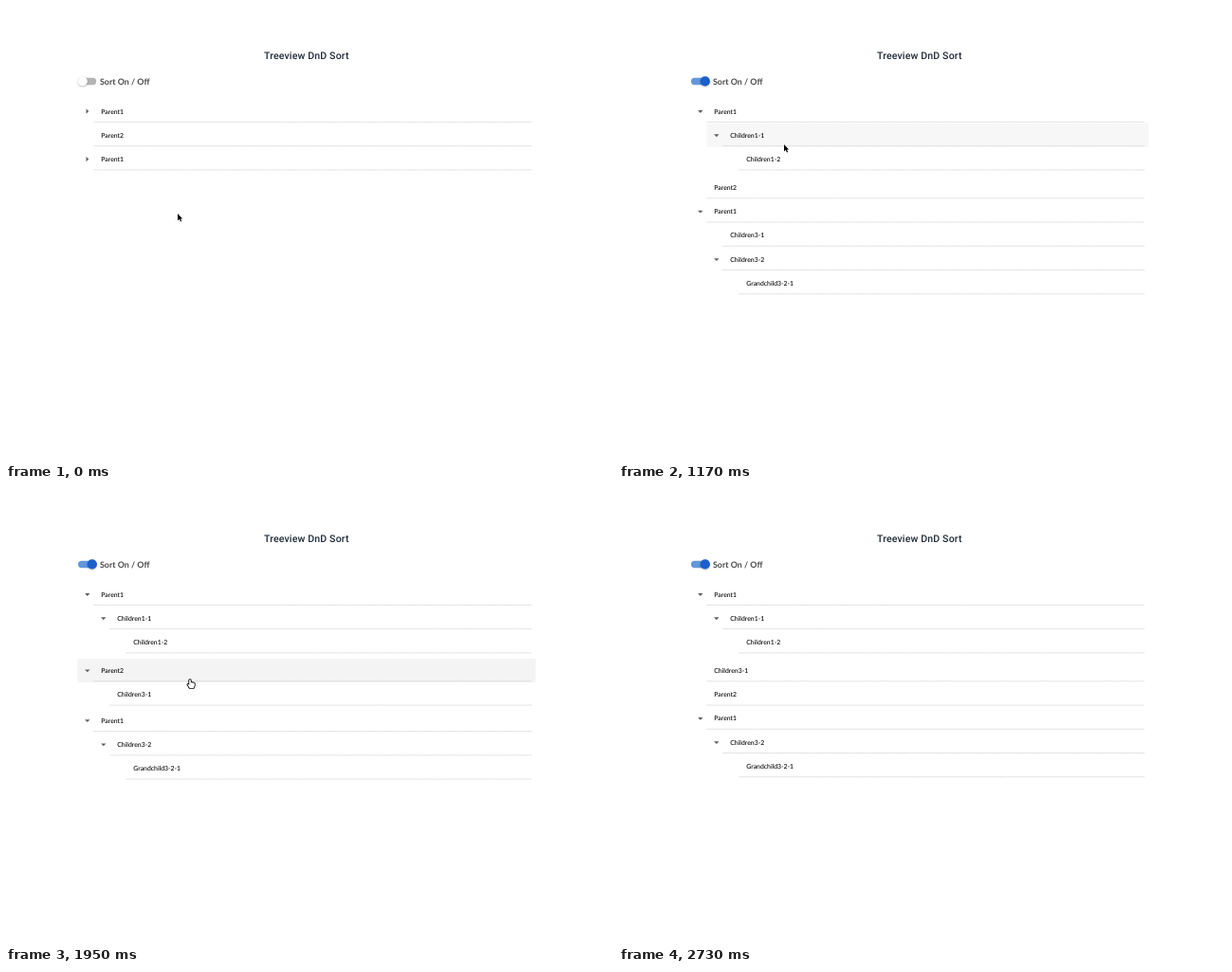
Animation of 640 by 480 pixels, one loop 3120 ms. Source, as an HTML page with a canvas:

```html
<!DOCTYPE html>
<html lang="en">
<head>
<meta charset="utf-8">
<title>Treeview DnD Sort</title>
<style>
  html, body { margin: 0; width: 100%; height: 100%; overflow: hidden; background: #fff; }
  canvas { display: block; }
</style>
</head>
<body>
<canvas id="stage" width="640" height="480"></canvas>
<script>
const ctx = document.getElementById('stage').getContext('2d');
ctx.textRendering = 'geometricPrecision';
const STEP = 130, LOOP = 3120;
const TOP = 111, PITCH = 25.25, INDENT = 17, RIGHT = 558.5;
const BLUE = '#1b5fcc';

// Each row: arrow state (> closed, v open, - leaf), depth, label
const tree = text => text.split(' ').map(s => ({ arrow: s[0], depth: +s[1], label: s.slice(2) }));
const FIRST = 'v0Parent1 -1Children1-1 -1Children1-2 -0Parent2 ';
const NESTED = 'v0Parent1 v1Children1-1 -2Children1-2 ';
const TAIL = ' v0Parent1 v1Children3-2 -2Grandchild3-2-1';
const THIRD = 'v0Parent1 -1Children3-1 v1Children3-2 -2Grandchild3-2-1';

const closed = tree('>0Parent1 -0Parent2 >0Parent1');
const openA = tree(FIRST + '>0Parent1');
const openB = tree(FIRST + 'v0Parent1 -1Children3-1 >1Children3-2');
const full = tree(FIRST + THIRD);
const dropA = tree('v0Parent1 -1Children1-1 -2Children1-2 -0Parent2 ' + THIRD);
const nested = tree(NESTED + '-0Parent2 ' + THIRD);
const dropB = tree(NESTED + '-0Parent2 -1Children3-1' + TAIL);
const moved = tree(NESTED + 'v0Parent2 -1Children3-1' + TAIL);
const sorted = tree(NESTED + '-0Children3-1 -0Parent2' + TAIL);

// sel: dragged row, into: row receiving it, ghost: drag image text position
const scenes = [
  { rows: closed, arrow: [181, 219] },
  { rows: openA, hand: [87, 111] },
  { rows: openB, hand: [87, 214] },
  { rows: full, hand: [104, 264] },
  { rows: full, hand: [94.5, 79], on: 1, ripple: 1 },
  { rows: full, hand: [120, 122], on: 1 },
  { rows: full, hand: [144.5, 161], on: 1, hover: { 2: .045 } },
  { rows: dropA, arrow: [177.5, 143], on: 1, sel: 2, into: 1, ghost: [150, 142.5] },
  { rows: dropA, arrow: [174, 146], on: 1, sel: 2, into: 1, ghost: [146.5, 145.5] },
  { rows: nested, arrow: [174, 146], on: 1, hover: { 1: .03 } },
  { rows: nested, hand: [170, 184], on: 1, hover: { 3: .045 } },
  { rows: nested, hand: [166, 222], on: 1, hover: { 3: .02, 4: .045 } },
  { rows: nested, hand: [164.5, 245.5], on: 1, hover: { 5: .042, 6: .018 } },
  { rows: nested, hand: [181, 223], on: 1, sel: 5, ghost: [134.5, 219] },
  { rows: dropB, hand: [195.5, 201], on: 1, sel: 4, into: 3, ghost: [149, 197], hover: { 5: .04 } },
  { rows: moved, hand: [194, 201], on: 1, hover: { 3: .045 } },
  { rows: moved, hand: [178, 209.5], on: 1, hover: { 4: .045 } },
  { rows: moved, arrow: [168, 189], on: 1, sel: 4, ghost: [107, 196] },
  { rows: sorted, arrow: [167, 185], on: 1, sel: 3, ghost: [106, 192] },
  { rows: sorted, arrow: [167, 186], on: 1, hover: { 3: .045 } },
  { rows: sorted, arrow: [167, 188], on: 1, hover: { 3: .03 } },
  { rows: sorted, on: 1 }
];

const arrowShape = new Path2D('M0 0V7.4L1.7 5.8 3 8.6 4.2 8.1 2.9 5.4H5.2Z');
const handShape = new Path2D('M-.8 .6Q0-.5 .8 .6V3.2L1.6 2.9 2.4 3.4 3.2 3.2 3.9 3.8 4.8 4V6.4L3.8 9H-.3L-2.6 5.6Q-2.7 4.6-1.7 4.9L-.8 5.7Z');

function box(x, y, w, h, r, color) {
  ctx.fillStyle = color;
  ctx.beginPath();
  ctx.roundRect(x, y, w, h, r);
  ctx.fill();
}

function disc(x, y, r, color) {
  ctx.fillStyle = color;
  ctx.beginPath();
  ctx.arc(x, y, r, 0, Math.PI * 2);
  ctx.fill();
}

function type(text, x, y, font, color, spacing = 0) {
  ctx.font = font;
  ctx.letterSpacing = spacing + 'px';
  ctx.fillStyle = color;
  ctx.fillText(text, x, y);
}

function label(text, x, y, color = '#000', weight = 500) {
  const family = weight === 500 ? '"Lato Medium", Lato' : 'Lato';
  type(text, x, y + 2.6, `${weight} 6.85px ${family}, sans-serif`, color);
}

function rule(x, y, color = '#d2d2d2', end = 554) {
  ctx.save();
  ctx.strokeStyle = color;
  ctx.lineWidth = .8;
  ctx.setLineDash([1.6, .5]);
  ctx.beginPath();
  ctx.moveTo(x, y + 11.4);
  ctx.lineTo(end, y + 11.4);
  ctx.stroke();
  ctx.restore();
}

function caret(kind, x, y) {
  if (kind === '-') return;
  ctx.fillStyle = '#606060';
  ctx.beginPath();
  if (kind === 'v') {
    ctx.moveTo(x - 2.7, y - .9);
    ctx.lineTo(x + 2.7, y - .9);
    ctx.lineTo(x, y + 1.9);
  } else {
    ctx.moveTo(x - 1.3, y - 2.6);
    ctx.lineTo(x + 1.5, y + .1);
    ctx.lineTo(x - 1.3, y + 2.8);
  }
  ctx.fill();
}

function toggle({ on, ripple }) {
  box(76, 75.8, 19.2, 7.4, 3.7, on ? '#6397db' : '#b4b4b4');
  const x = on ? (ripple ? 89.7 : 90.8) : 80.8;
  if (ripple) disc(x, 79.5, 11, 'rgba(27,95,204,.22)');
  ctx.save();
  ctx.shadowColor = 'rgba(0,0,0,.3)';
  ctx.shadowBlur = 2;
  ctx.shadowOffsetY = .7;
  disc(x, 79.4, 5.1, on ? BLUE : '#fdfdfd');
  ctx.restore();
  type('Sort On / Off', 99, 82.5, '700 8.9px Lato, sans-serif', '#484848');
}

function drawRows({ rows, on, ripple, sel, into, hover = {} }) {
  const gap = on && !ripple ? 2.3 : 1.7;
  let y = TOP;
  rows.forEach((row, i) => {
    if (i) {
      const dropped = into !== undefined && i - 1 === sel ? 1 : 0;
      y += PITCH + gap * Math.max(0, rows[i - 1].depth - row.depth - dropped);
    }
    const base = 100.3 + INDENT * row.depth;
    const shift = into !== undefined && (i === into || i === sel) ? 1.8 : 0;
    const x = base + shift, left = x - 25;
    if (hover[i]) box(left, y - 12.4, RIGHT - left, 25, 0, `rgba(0,0,0,${hover[i]})`);
    if (i === into) box(base - 25.3, y - 12.3, 2, 50.5, 0, '#2461b3');
    if (i === sel) {
      box(left, y - 12.2, RIGHT - left, 25.2, 2.5, '#6498da');
      label(row.label, x, y, 'rgba(40,50,65,.68)');
    } else {
      rule(x - 8, y);
      label(row.label, x, y, undefined, i === into ? 700 : 500);
      caret(row.arrow, base - 14.5, y);
    }
  });
}

function drawGhost({ rows, sel, ghost }) {
  if (!ghost) return;
  const [x, y] = ghost;
  box(x - 25, y - 12.3, 466, 23.6, 0, 'rgba(0,0,0,.05)');
  rule(x - 25, y, 'rgba(0,0,0,.15)', Math.min(x + 441, 558));
  label(rows[sel].label, x, y, '#303030');
}

function pointer(shape, at, fill, edge, width) {
  if (!at) return;
  ctx.save();
  ctx.translate(...at);
  ctx.lineJoin = 'round';
  ctx.strokeStyle = edge;
  ctx.lineWidth = width;
  ctx.stroke(shape);
  ctx.fillStyle = fill;
  ctx.fill(shape);
  ctx.restore();
}

function draw(scene) {
  ctx.fillStyle = '#fff';
  ctx.fillRect(0, 0, 640, 480);
  type('Treeview DnD Sort', 272, 55.8, '500 10.6px Roboto, sans-serif', '#202c38', .12);
  toggle(scene);
  drawRows(scene);
  drawGhost(scene);
  pointer(arrowShape, scene.arrow, '#000', '#fff', .9);
  pointer(handShape, scene.hand, '#fff', '#000', 1.7);
}

const start = performance.now();
function tick() {
  const t = (performance.now() - start) % LOOP;
  draw(scenes[Math.min(Math.floor(t / STEP), scenes.length - 1)]);
  requestAnimationFrame(tick);
}
tick();
</script>
</body>
</html>
```
